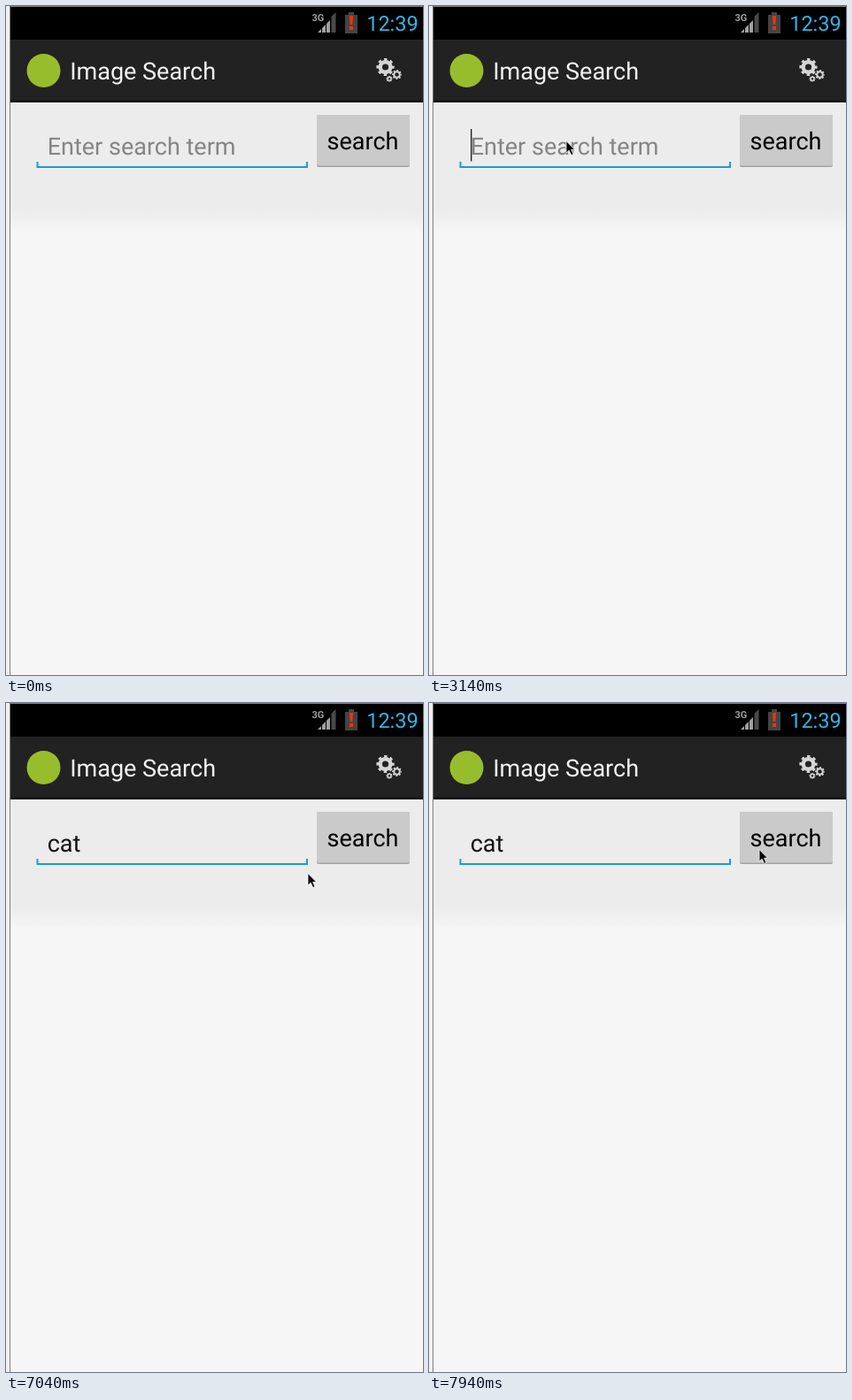
Write an HTML page that moves like this. It is 471 by 756 pixels and loops after 8000 ms.

```html
<!DOCTYPE html>
<html lang="en">
<head>
<meta charset="utf-8">
<title>Image Search</title>
<style>
  html, body { margin: 0; width: 100%; height: 100%; overflow: hidden; background: #f6f6f6; }
  svg { display: block; font: 27px Roboto, sans-serif; text-rendering: geometricPrecision; }
</style>
</head>
<body>
<svg width="471" height="756" viewBox="0 0 471 756">
  <defs>
    <linearGradient id="fade" x2="0" y2="1">
      <stop stop-color="#ececec"/>
      <stop offset="1" stop-color="#f4f4f4"/>
    </linearGradient>
  </defs>

  <!-- Window and screen -->
  <rect width="471" height="756" fill="#f6f6f6"/>
  <rect y="109" width="471" height="121" fill="#ececec"/>
  <rect y="230" width="471" height="22" fill="url(#fade)"/>
  <rect width="471" height="38"/>
  <rect y="38" width="471" height="71" fill="#222"/>
  <rect y="106" width="471" height="3" fill="#161616"/>
  <rect width="4" height="756" fill="#f0f0f0"/>
  <path d="M4.5 756V.5H471" fill="none" stroke="#808080"/>

  <!-- Status bar -->
  <text x="345.5" y="17" font-size="11" font-weight="700" fill="#a0a0a0">3G</text>
  <g fill="#a0a0a0">
    <path d="M352 30l4-4v4zM357 30v-5l4-4v9zM362 30V20l4-4v14z"/>
    <path d="M367.5 30V12l5-5v23z" fill="#4a4a4a"/>
  </g>
  <path d="M383 10h4V7h6v3h4v21h-14z" fill="#444"/>
  <path d="M388 11h4l-.7 10h-2.6zM388 23h4v4h-4z" fill="#f3320c"/>
  <text x="407.2" y="28" font-size="23.5" fill="#33b5e5">12:39</text>

  <!-- Action bar -->
  <circle cx="42.5" cy="73" r="19" fill="#98bd2c"/>
  <text x="72.2" y="83" fill="#f3f3f3">Image Search</text>
  <g id="gears" fill="none" stroke="#d6d6d6"></g>

  <!-- Search form -->
  <path d="M35.5 176v6h304.5v-6" fill="none" stroke="#1c9dcc" stroke-width="2"/>
  <text id="field" x="46.7" y="168"></text>
  <rect id="caret" y="139" width="1.4" height="36.5" fill="#222"/>
  <rect id="glow" x="346" y="117" width="115" height="70" rx="4" fill="#a0d5ec"/>
  <rect id="edge" x="351" y="123" width="105" height="59" rx="2"/>
  <rect id="button" x="351" y="123" width="105" height="57.5" rx="2"/>
  <text x="362.6" y="162">search</text>

  <path id="pointer" d="M1 .5V14l3.2-2.8 2.5 5.3 2.3-1-2.4-5.2h4z" stroke="#fff" stroke-width=".8"/>
</svg>
<script>
const LOOP = 8000;
const $ = id => document.getElementById(id);
const caretX = { '': 47, c: 60, ca: 75.3, cat: 83.8 };

// Each step lists only what changes at its time.
const steps = [
  { at: 0, text: '', caret: 0, x: -50, y: 0, pressed: 0 },
  { at: 150, caret: 1 },
  { at: 590, caret: 0 },
  { at: 1190, caret: 1, x: 327, y: 1 },
  { at: 1340, x: 312, y: 6 },
  { at: 1490, x: 152, y: 150 },
  { at: 1640, caret: 0, x: 153 },
  { at: 1940, x: 154, y: 152 },
  { at: 3140, caret: 1 },
  { at: 3890, caret: 0 },
  { at: 4490, caret: 1, text: 'c' },
  { at: 5840, text: 'ca' },
  { at: 6290, caret: 0 },
  { at: 6440, caret: 1, text: 'cat' },
  { at: 6890, x: 291, y: 173 },
  { at: 7040, caret: 0, x: 340, y: 192 },
  { at: 7190, x: 364, y: 174 },
  { at: 7340, x: 370, y: 167 },
  { at: 7490, caret: 1, x: 372, y: 166 },
  { at: 7640, y: 165 },
  { at: 7790, pressed: 1 },
  { at: 7940, pressed: 0, caret: 0 }
];

// A ring with eight evenly spaced teeth.
function gear(x, y, r, width, tooth) {
  const pitch = 2 * Math.PI * (r + width / 2) / 8;
  return `<circle cx="${x}" cy="${y}" r="${r}" stroke-width="${width}"/>
    <circle cx="${x}" cy="${y}" r="${r + width / 2}" stroke-width="${tooth}"
      stroke-dasharray="${pitch / 2}" stroke-dashoffset="${pitch / 4}"/>`;
}
$('gears').innerHTML = gear(428.5, 69, 5.8, 4.4, 4.2)
  + gear(441.5, 77.5, 3.3, 2, 2.4) + gear(433, 82.3, 2, 1.5, 1.6);

function draw(t) {
  const s = Object.assign({}, ...steps.filter(step => step.at <= t));
  $('field').textContent = s.text || 'Enter search term';
  $('field').setAttribute('fill', s.text ? '#111' : '#858585');
  $('caret').setAttribute('x', caretX[s.text]);
  $('caret').setAttribute('opacity', s.caret);
  $('glow').setAttribute('opacity', s.pressed);
  $('edge').setAttribute('fill', s.pressed ? '#3599c0' : '#a3a3a3');
  $('button').setAttribute('fill', s.pressed ? '#42b9e9' : '#cacaca');
  $('pointer').setAttribute('transform', `translate(${s.x} ${s.y})`);
}

const start = performance.now();
function tick() {
  draw((performance.now() - start) % LOOP);
  requestAnimationFrame(tick);
}
tick();
</script>
</body>
</html>
```
